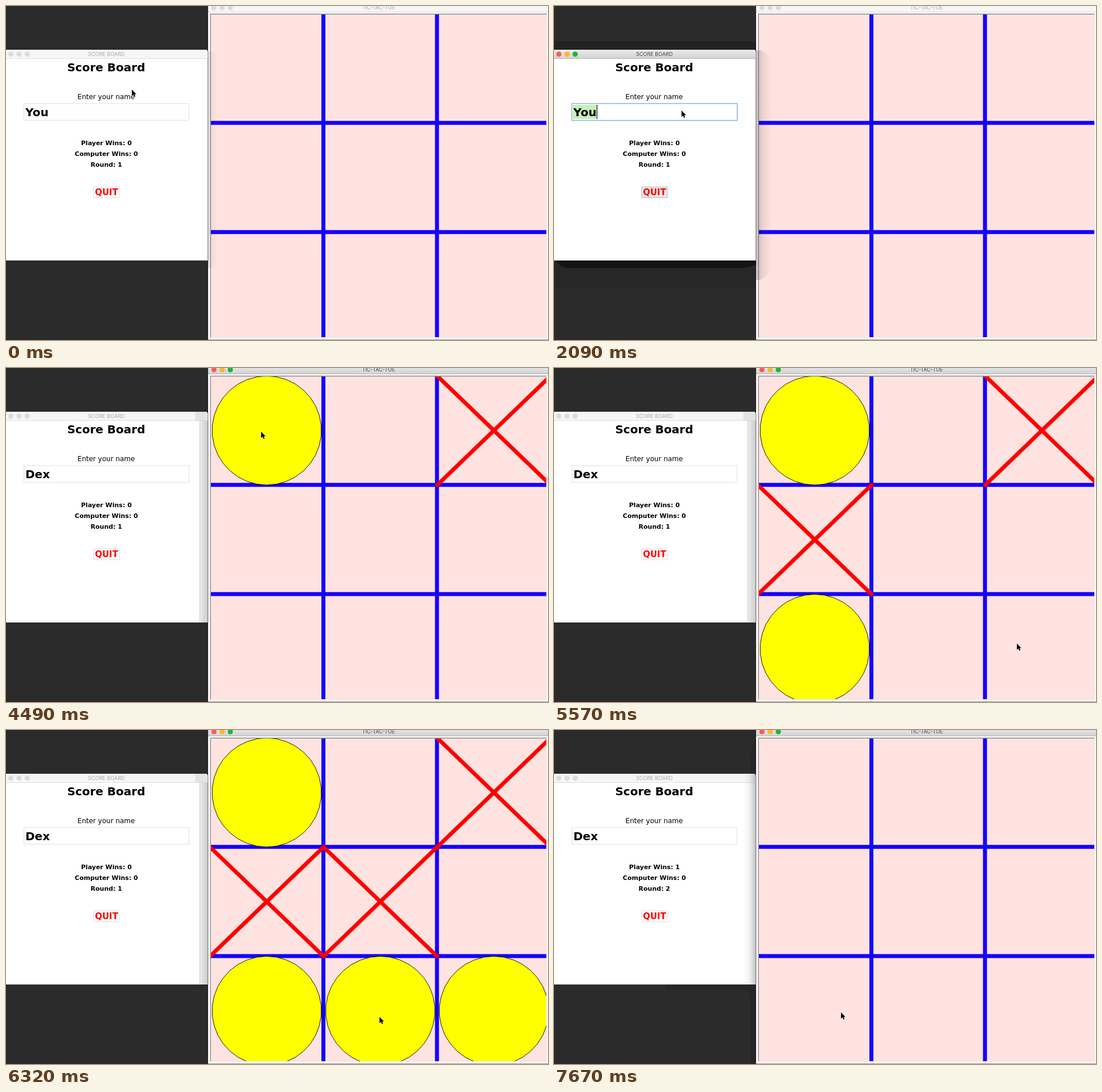
Animation of 952 by 588 pixels, one loop 7.99 s. Source, as an HTML page:

```html
<!DOCTYPE html>
<html lang="en">
<head>
<meta charset="utf-8">
<title>Tic-tac-toe</title>
<style>
  html, body { margin: 0; width: 100%; height: 100%; overflow: hidden; background: #2b2b2b; }
  svg { display: block; width: 952px; height: 588px; }
  text { text-anchor: middle; font-family: "DejaVu Sans", sans-serif; }
  .bold { font-weight: 700; }
  .title { font: 9.1px Inter, sans-serif; }
  .stat { font-size: 11px; font-weight: 700; }
  .field { font-size: 20px; font-weight: 700; text-anchor: start; }
  .banner { font-family: "Liberation Sans", Arial, sans-serif; }
</style>
</head>
<body>
<svg viewBox="0 0 952 588">
  <defs>
    <linearGradient id="bar" x2="0" y2="1">
      <stop stop-color="#ebebeb"/><stop offset="1" stop-color="#d2d2d2"/>
    </linearGradient>
    <linearGradient id="castRight">
      <stop stop-opacity=".22"/><stop offset=".4" stop-opacity=".08"/><stop offset="1" stop-opacity="0"/>
    </linearGradient>
    <linearGradient id="castLeft">
      <stop stop-opacity="0"/><stop offset=".5" stop-opacity=".06"/><stop offset="1" stop-opacity=".24"/>
    </linearGradient>
    <clipPath id="canvas"><rect x="360" y="15" width="589" height="568"/></clipPath>
    <g id="idleLights" fill="#dcdcdc">
      <circle r="4.6"/><circle cx="14.4" r="4.6"/><circle cx="28.7" r="4.6"/>
    </g>
    <g id="liveLights">
      <circle r="4.6" fill="#fc5b57"/><circle cx="14.4" r="4.6" fill="#f8b82f"/><circle cx="28.7" r="4.6" fill="#1db534"/>
    </g>
  </defs>

  <rect width="952" height="588" fill="#2b2b2b"/>

  <!-- game window -->
  <rect x="355" width="597" height="588" fill="#fff"/>
  <rect x="355" width="597" height="10.5" fill="#f6f6f6"/>
  <rect x="355" y="10" width="597" height="1" fill="#d8d8d8"/>
  <g data-on="0-4490">
    <use href="#idleLights" x="365.3" y="3"/>
    <text class="title" x="654.3" y="6.3" fill="#aaa">TIC-TAC-TOE</text>
  </g>
  <g data-on="4490-7990">
    <rect x="355" y="-5" width="597" height="15.5" fill="url(#bar)"/>
    <rect x="355" y="10" width="597" height="1" fill="#b4b4b4"/>
    <use href="#liveLights" x="365.3" y="3"/>
    <text class="title" x="654.3" y="6.3" fill="#484848">TIC-TAC-TOE</text>
  </g>
  <path d="M359.2 584V14.2H950" fill="none" stroke="#888" stroke-width="1.4"/>
  <path d="M359 583.7H949.7V14" fill="none" stroke="#e4e4e4"/>
  <rect x="355" y="587" width="597" height="1" fill="#8c8c8c"/>
  <g clip-path="url(#canvas)">
    <rect x="360" y="15" width="589" height="568" fill="#ffe3e0"/>
    <path d="M557.5 0V588M757 0V588M350 205.8H952M350 398H952" stroke="#1400ff" stroke-width="7"/>
    <g id="marks"></g>
    <g data-on="6470-7520">
      <text class="banner" x="657" y="272" font-size="143" fill="#0ff">O WINS!</text>
      <text class="banner bold" x="656" y="391" font-size="86" fill="#ff1493">HIGH SCORE</text>
    </g>
  </g>

  <!-- shadows of the score window -->
  <path data-on="0-1830" d="M355 80H362Q372 84 372 96V440Q372 458 362 461H355Z" fill="url(#castRight)" opacity=".5"/>
  <g data-on="1830-4490">
    <rect y="62" width="355" height="20" fill="#222"/>
    <rect y="448" width="355" height="49" fill="#272727"/>
    <path d="M4 448Q10 461.5 30 461.5H322Q344 461 355 456V448Z" fill="#141414"/>
    <path d="M355 78H364Q383 88 383 110V450Q383 474 362 482H355Z" fill="url(#castRight)"/>
  </g>

  <!-- score window -->
  <path d="M0 77H350Q354.5 77 354.5 81.500V448H0Z" fill="#fff"/>
  <path d="M0 77H350Q354.5 77 354.5 81.500V92.500H0Z" fill="#f6f6f6"/>
  <path d="M0 92.500H354.500" stroke="#dcdcdc"/>
  <g data-on="0-1830 4490-7990">
    <use href="#idleLights" x="8.5" y="84.8"/>
    <text class="title" x="176.300" y="88.200" fill="#aaa">SCORE BOARD</text>
    <rect x="154" y="318.500" width="45" height="19" fill="#fff" stroke="#dedede"/>
  </g>
  <g data-on="1830-4490">
    <path d="M0 77H350Q354.5 77 354.5 81.500V92.500H0Z" fill="url(#bar)"/>
    <path d="M0 92.500H354.500" stroke="#b4b4b4"/>
    <use href="#liveLights" x="8.5" y="84.8"/>
    <text class="title" x="176.300" y="88.200" fill="#484848">SCORE BOARD</text>
    <rect x="154" y="318.500" width="45" height="19" fill="#e9e9e9" stroke="#b5b5b5"/>
  </g>
  <text class="bold" x="176" y="114.700" font-size="20">Score Board</text>
  <text x="176" y="164.400" font-size="12">Enter your name</text>
  <rect x="31.500" y="171.800" width="290" height="29.400" fill="#fff" stroke="#dedede"/>
  <rect data-on="1980-4490" x="31.300" y="171.600" width="290.500" height="30" fill="none" stroke="#8db5e2" stroke-width="1.500"/>
  <rect data-on="2090-3290" x="33" y="174" width="43.500" height="25" fill="#c7efb6"/>
  <text class="field" id="name" x="34" y="194.400"></text>
  <rect data-on="1980-2690 2990-4490" id="caret" y="174" width="1" height="25"/>
  <text class="stat" id="wins" x="176.300" y="244.700"></text>
  <text class="stat" x="176.300" y="264">Computer Wins: 0</text>
  <text class="stat" id="round" x="176.300" y="283.200"></text>
  <text class="bold" x="176.500" y="333.300" font-size="15" fill="#f00">QUIT</text>

  <!-- shadows of the game window -->
  <g data-on="4490-7520">
    <rect x="332.500" y="77" width="22" height="15.500" opacity=".08"/>
    <rect x="339" y="93" width="15.500" height="355" opacity=".1"/>
    <rect x="346" y="93" width="8.500" height="355" opacity=".06"/>
    <rect x="351.500" y="93" width="3" height="355" opacity=".06"/>
  </g>
  <g data-on="7520-7990">
    <rect x="333" y="77" width="21.500" height="371" fill="url(#castLeft)"/>
    <path d="M196 448H355V588H346V476Q346 457 326 457H196Z" fill="#262626"/>
    <path d="M355 15Q346 24 346 45V77H355Z" fill="#262626"/>
  </g>
  <path d="M354.900 80V448" stroke="#777" stroke-width=".8"/>

  <path id="cursor" d="M0 0V11.200L2.600 8.800L4.400 12.800L6.300 12L4.600 8.200H8Z" stroke="#fff" stroke-width="1" paint-order="stroke"/>
</svg>
<script>
const LOOP = 7990;
const CLEAR = 7520;
const $ = id => document.getElementById(id);

// Turtle-style circle: an inscribed 34-sided polygon.
function drawO(x, y) {
  const sides = 34, r = 96;
  const points = Array.from({ length: sides }, (_, i) => {
    const a = i * 2 * Math.PI / sides;
    return `${(x + r * Math.sin(a)).toFixed(2)},${(y + r * Math.cos(a)).toFixed(2)}`;
  });
  return `<polygon points="${points.join(' ')}" fill="#ff0" stroke="#000" stroke-width=".9"/>`;
}

function drawX(x, y) {
  const w = 99.5, h = 96;
  return `<path d="M${x - w} ${y - h}l${2 * w} ${2 * h}M${x - w} ${y + h}l${2 * w} ${-2 * h}"
    stroke="red" stroke-width="7" stroke-linecap="round"/>`;
}

// [draw, column, row, time placed]
const moves = [
  [drawO, 0, 0, 4490], [drawX, 2, 0, 4490],
  [drawO, 0, 2, 5240], [drawX, 0, 1, 5240],
  [drawO, 2, 2, 5870], [drawX, 1, 1, 5870],
  [drawO, 1, 2, 6320]
];
$('marks').innerHTML = moves.map(([draw, col, row, time]) =>
  `<g data-on="${time}-${CLEAR}">${draw(458 + col * 199.5, 110 + row * 192.2)}</g>`).join('');

// Each track holds its value until the next time.
const cursorTrack = [
  [0, [221, 147]], [150, [247, 154]], [1080, [243, 154]], [1230, [232, 154]], [1380, [226, 154]],
  [1680, [225, 168]], [1830, [224, 184]],
  [3740, [250, 199]], [3890, [318, 182]], [4040, [400, 142]], [4190, [448, 112]],
  [4790, [450, 190]], [4940, [450, 350]], [5090, [452, 468]], [5420, [640, 482]], [5570, [813, 485]],
  [6020, [780, 490]], [6170, [668, 504]], [6320, [656, 505]],
  [6920, [640, 504]], [7070, [575, 494]], [7220, [543, 489]], [CLEAR, [504, 497]]
];
const nameTrack = [[0, 'You'], [3290, 'D'], [3440, 'De'], [3590, 'Dex']];

const valueAt = (track, t) => track.findLast(([start]) => start <= t)[1];

const timed = [...document.querySelectorAll('[data-on]')].map(node => ({
  node,
  spans: node.dataset.on.split(' ').map(span => span.split('-').map(Number))
}));

function setText(id, value) {
  if ($(id).textContent !== value) $(id).textContent = value;
}

function render(now) {
  const t = now % LOOP;
  for (const { node, spans } of timed) {
    const on = spans.some(([from, to]) => t >= from && t < to);
    node.style.display = on ? '' : 'none';
  }
  const [x, y] = valueAt(cursorTrack, t);
  $('cursor').setAttribute('transform', `translate(${x} ${y})`);
  setText('name', valueAt(nameTrack, t));
  $('caret').setAttribute('x', Math.round(34 + $('name').getComputedTextLength()));
  setText('wins', `Player Wins: ${t < CLEAR ? 0 : 1}`);
  setText('round', `Round: ${t < CLEAR ? 1 : 2}`);
}

const start = performance.now();
function tick() {
  render(performance.now() - start);
  requestAnimationFrame(tick);
}
tick();
</script>
</body>
</html>
```
